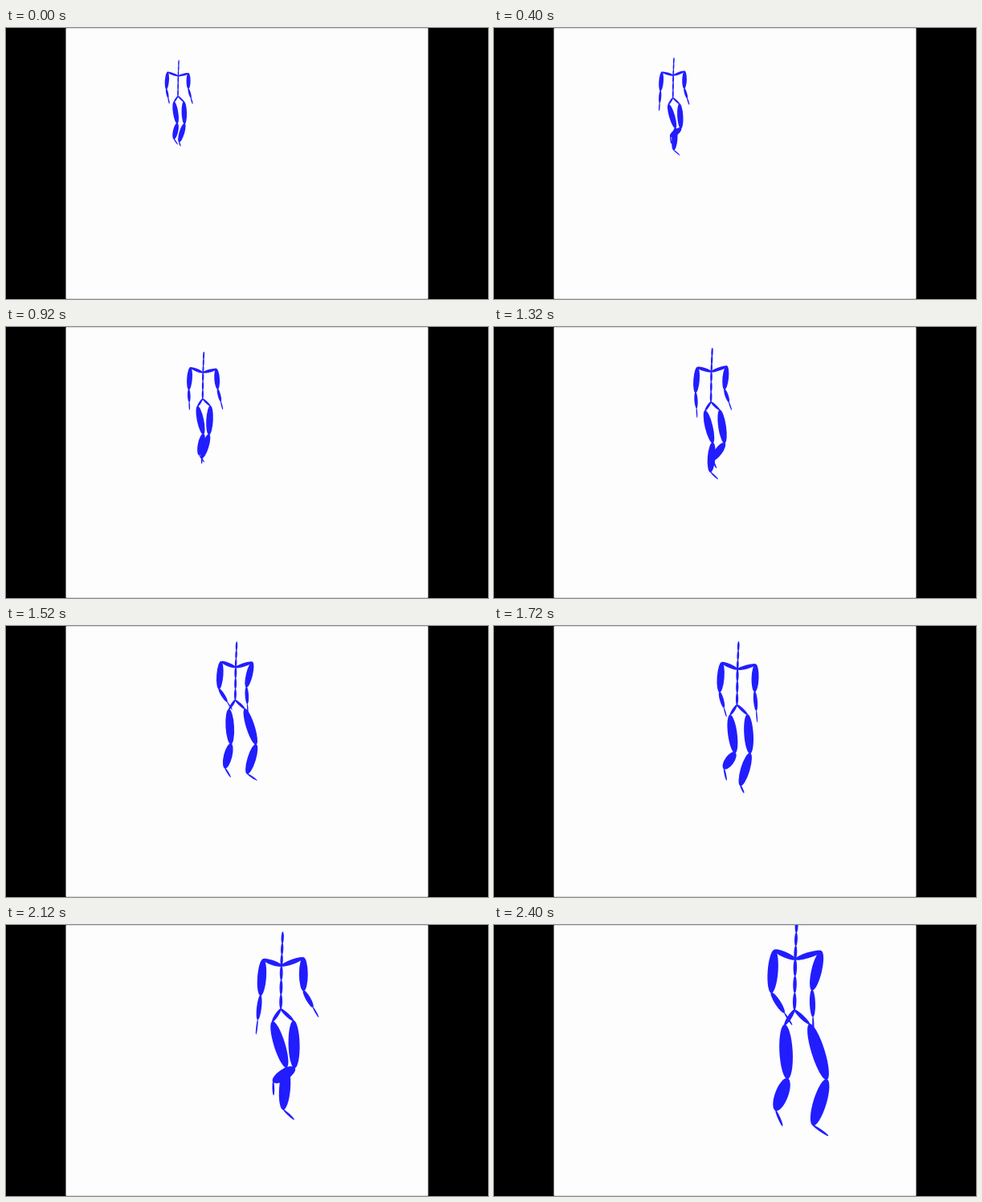
Recreate the animation shown at these times as an HTML page with a canvas. Size 600x338 px, loop 2.44 s.

```html
<!DOCTYPE html>
<html lang="en">
<head>
<meta charset="utf-8">
<title>Walking figure</title>
<style>
html, body { margin: 0; width: 100%; height: 100%; overflow: hidden; background: #000; }
canvas { display: block; width: 100vw; height: 100vh; }
</style>
</head>
<body>
<canvas id="stage" width="600" height="338"></canvas>
<script>
const ctx = document.getElementById('stage').getContext('2d');
const LOOP = 2440, STEP = 40, STRIDE = 870, FIRST_LIFT = 410;

// Joint offsets in spine lengths, each from the joint before it.
// c, s: cosine and sine of the leg's own stride; lift: how far the foot is raised.
const leftLimbs = (c, s, lift, turn) => ({
  shoulder: [-0.52 + 0.12 * turn, -0.17 - 0.023 * c],
  elbow: [-0.06, 0.82],
  hand: [0.08 + 0.12 * c - 0.3 * s, 0.77 - 0.09 * c + 0.13 * s],
  hip: [-0.19, 0.29],
  knee: [0.21 - 0.08 * c + 0.14 * s, 1.04],
  ankle: [-0.07 - 0.35 * lift, 0.97 - 0.8 * lift],
  toe: [0.25 - 0.27 * lift, 0.23 + 0.15 * lift]
});

const rightLimbs = (c, s, lift, turn) => ({
  shoulder: [0.5, -0.16 - 0.025 * c],
  elbow: [-0.03 - 0.15 * s, 0.75],
  hand: [0.18 + 0.16 * c * turn - 0.12 * s, 0.74 - 0.15 * c * turn + 0.05 * s],
  hip: [0.29, 0.275],
  knee: [0.08 + 0.26 * s, 1.07],
  ankle: [-0.26 - 0.24 * lift, 0.9 - 0.62 * lift],
  toe: [0.1 + 0.2 * s - 0.05 * lift, 0.2 + 0.11 * lift]
});

const mix = (a, b, k) => [a[0] + (b[0] - a[0]) * k, a[1] + (b[1] - a[1]) * k];
const shift = (p, d, size) => [p[0] + d[0] * size, p[1] + d[1] * size];

// One spindle between two joints
function bone(a, b, width) {
  const dx = b[0] - a[0], dy = b[1] - a[1], [x, y] = mix(a, b, 0.5);
  ctx.beginPath();
  ctx.ellipse(x, y, Math.hypot(dx, dy) / 2 + 0.5, Math.max(width, 1.5) / 2,
    Math.atan2(dy, dx), 0, Math.PI * 2);
  ctx.fill();
}

function chain(a, b, count, width) {
  for (let k = 0; k < count; k++) bone(mix(a, b, k / count), mix(a, b, (k + 1) / count), width);
}

function drawSide(limbs, phase, strength, turn, size, neck, pelvis) {
  const lift = strength * Math.exp(2.25 * (Math.cos(phase + 0.44) - 1));
  const to = limbs(Math.cos(phase), Math.sin(phase), lift, turn);
  const next = (from, name) => shift(from, to[name], size);

  const shoulder = next(neck, 'shoulder'), elbow = next(shoulder, 'elbow');
  const hand = next(elbow, 'hand'), wrist = mix(elbow, hand, 0.62);
  bone(neck, shoulder, size * 0.11);
  bone(shoulder, elbow, size * 0.2);
  bone(elbow, wrist, size * 0.11);
  bone(wrist, hand, size * 0.035);

  const hip = next(pelvis, 'hip'), knee = next(hip, 'knee');
  const ankle = next(knee, 'ankle'), toe = next(ankle, 'toe');
  bone(pelvis, hip, size * 0.08);
  bone(hip, knee, size * 0.255);
  bone(knee, ankle, size * 0.255);
  bone(ankle, toe, size * 0.05);
}

function drawStage() {
  ctx.fillStyle = '#000';
  ctx.fillRect(0, 0, 600, 338);
  ctx.fillStyle = '#d8d8da';
  ctx.fillRect(74.67, 0, 450.66, 338);
  ctx.fillStyle = '#fdfdfe';
  ctx.fillRect(74.67, 1, 450.66, 336);
}

function draw(t) {
  drawStage();
  ctx.fillStyle = '#211dff';

  // The figure nears the viewer, drifts right and bobs twice per stride
  const turn = t / LOOP;
  const phase = (t - FIRST_LIFT) / STRIDE * 2 * Math.PI;
  const size = 25.5 / (1 - 0.000252 * t);
  const bob = 0.045 * size * Math.cos(2 * phase);
  const pelvis = [214 + 0.0128 * t + 2.245e-5 * t * t, 83.9 + 0.63 * (size - 25.5) + bob];
  const neck = shift(pelvis, [0.015, -0.98], size);

  chain(shift(neck, [0.03, -0.77], size), neck, 3, size * 0.06);
  chain(neck, pelvis, 3, size * 0.07);
  drawSide(leftLimbs, phase + Math.PI, 0.4 + 0.65 * turn, turn, size, neck, pelvis);
  drawSide(rightLimbs, phase, 1, turn, size, neck, pelvis);
}

const start = performance.now();
function tick() {
  const t = (performance.now() - start) % LOOP;
  draw(Math.floor(t / STEP) * STEP);
  requestAnimationFrame(tick);
}
tick();
</script>
</body>
</html>
```
